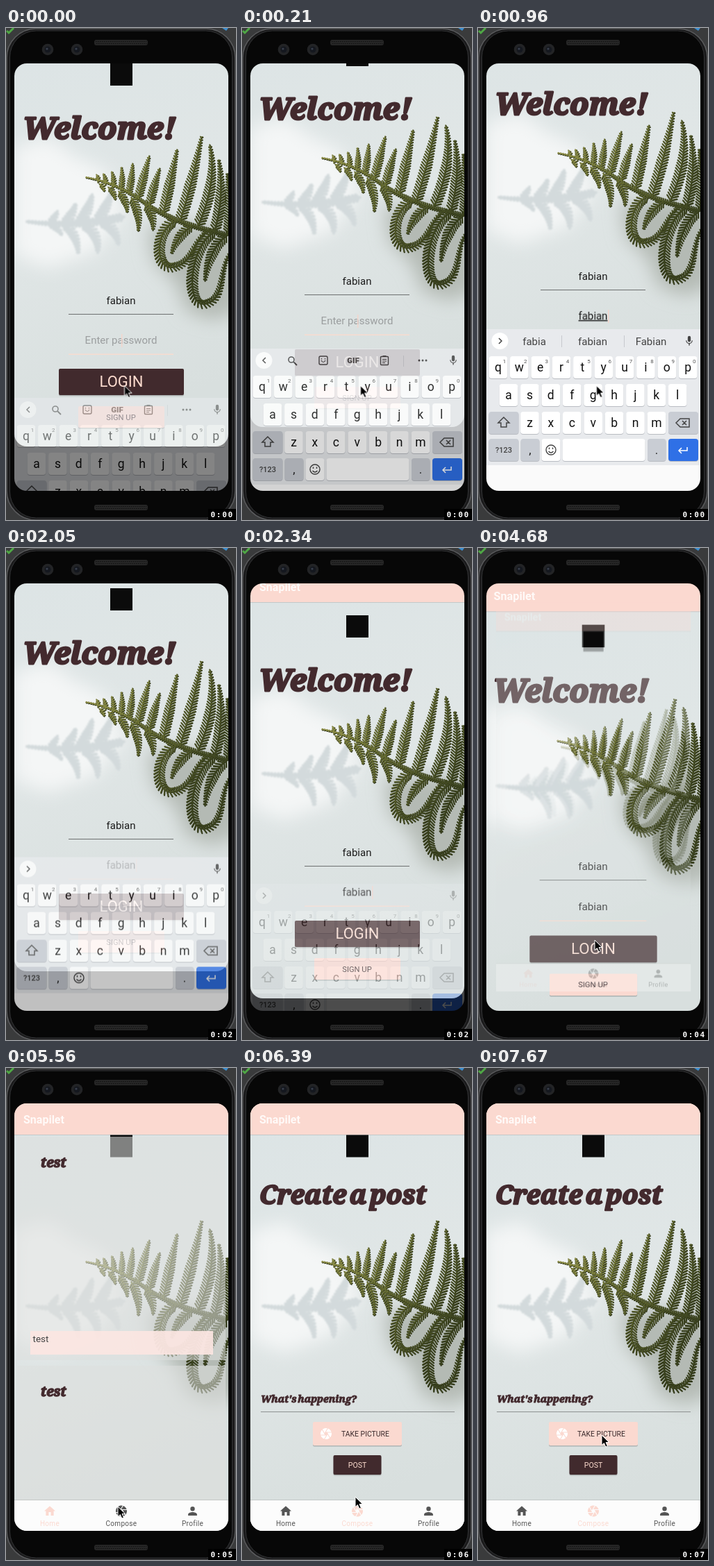
Animation of 331x709 px, one loop 8 s. Source, as an HTML page:

```html
<!DOCTYPE html>
<html lang="en">
<head>
<meta charset="utf-8">
<title>Phone login demo</title>
<style>
  html, body { margin: 0; width: 100%; height: 100%; overflow: hidden; background: #3a3b3c; }
  svg { display: block; width: 331px; height: 709px; }
  text { font-family: Roboto, Arial, sans-serif; text-anchor: middle; white-space: pre; }
  .fat { font: italic 700 44px "Noto Serif", serif; text-anchor: start; fill: #432a2e; stroke: #432a2e; stroke-linejoin: round; word-spacing: -.14em; }
  .clock { font: 700 11px "DejaVu Sans Mono", monospace; letter-spacing: 1.7px; text-anchor: start; }
  .start { text-anchor: start; }
  #login, #home { transform-origin: 166px 359px; }
</style>
</head>
<body>
<svg id="stage" viewBox="0 0 331 709" xmlns="http://www.w3.org/2000/svg"></svg>
<script>
const LOOP = 8000, NAME = 'fabian', APP = 'Snapilet';
const PINK = '#fbd9d0', DARK = '#412a2d';

const rect = (x, y, w, h, fill, rx = 0, more = '') =>
  `<rect x="${x}" y="${y}" width="${w}" height="${h}" rx="${rx}" fill="${fill}" ${more}/>`;
const text = (x, y, s, size, fill, more = '') =>
  `<text x="${x}" y="${y}" font-size="${size}" fill="${fill}" ${more}>${s}</text>`;
const fat = (x, y, s, size, weight) =>
  `<text class="fat" x="${x}" y="${y}" style="font-size:${size}px;stroke-width:${weight}">${s}</text>`;
const icon = (d, x, y, k, fill) =>
  `<path d="${d}" fill="${fill}" transform="translate(${x - 12 * k} ${y - 12 * k}) scale(${k})"/>`;
const line = (d, stroke, w = 1.5, more = '') =>
  `<path d="${d}" fill="none" stroke="${stroke}" stroke-width="${w}" ${more}/>`;

const ICONS = {
  home: 'M10 20v-6h4v6h5v-8h3L12 3 2 12h3v8z',
  person: 'M12 12a4 4 0 1 0 0-8 4 4 0 0 0 0 8zm0 2c-2.67 0-8 1.34-8 4v2h16v-2c0-2.66-5.33-4-8-4z',
  shutter: 'M9.4 10.5l4.77-8.26C13.47 2.09 12.75 2 12 2c-2.4 0-4.6.85-6.32 2.25l3.66 6.35zM21.54 9c-.92-2.92-3.15-5.26-6-6.34L11.88 9zm.26 1h-7.49l.29.5 4.76 8.25C21 16.97 22 14.61 22 12c0-.69-.07-1.35-.2-2zM8.54 12l-3.9-6.75C3.01 7.03 2 9.39 2 12c0 .69.07 1.35.2 2h7.49zm-6.08 3c.92 2.92 3.15 5.26 6 6.34L12.12 15zm11.27 0l-3.9 6.76c.7.15 1.42.24 2.17.24 2.4 0 4.6-.85 6.32-2.25l-3.66-6.35z',
  mic: 'M12 14a3 3 0 0 0 3-3V5a3 3 0 0 0-6 0v6a3 3 0 0 0 3 3zm5-3a5 5 0 0 1-10 0H5.3c0 3.4 2.7 6.2 5.7 6.7V21h2v-3.3c3-.5 5.7-3.3 5.7-6.7z'
};

// Leaflets on both sides of a curve, shrinking towards its end.
const probe = document.createElementNS('http://www.w3.org/2000/svg', 'path');
function frond(d, leaf, gap = 2.6 + leaf * 0.17) {
  probe.setAttribute('d', d);
  const total = probe.getTotalLength();
  let out = d;
  for (let s = 2; s < total - 0.6; s += gap) {
    const p = probe.getPointAtLength(s), q = probe.getPointAtLength(s + 0.5);
    const dir = Math.atan2(q.y - p.y, q.x - p.x);
    const len = leaf * Math.min(1, 0.2 + 1.3 * (1 - s / total));
    for (const side of [-0.95, 0.95]) {
      const a = dir + side;
      out += `M${p.x.toFixed(1)} ${p.y.toFixed(1)}l${(len * Math.cos(a)).toFixed(1)} ${(len * Math.sin(a)).toFixed(1)}`;
    }
  }
  return out;
}
const plant = list => list.map(([d, leaf, gap]) => frond(d, leaf, gap)).join('');

const fern = plant([
  ['M320 362Q240 345 200 316T115 279', 4],
  ['M132 286Q134 280 130 275', 3], ['M143 290Q144 281 140 274', 3.5],
  ['M154 294Q156 281 152 271', 4], ['M165 298Q168 281 166 265', 4.5],
  ['M176 303Q181 280 182 259', 5.5], ['M190 309Q197 280 206 248', 7],
  ['M206 319Q212 292 221 266', 7], ['M226 331Q236 285 246 239', 8.5],
  ['M250 342Q268 285 281 221', 9.5], ['M276 349Q304 285 293 232', 9.5],
  ['M300 356Q314 305 306 254', 9], ['M319 360Q323 320 318 274', 8],
  ['M134 288Q141 293 141 299', 3.5], ['M147 293Q156 301 157 311', 4.5],
  ['M162 299Q174 314 174 329', 6], ['M180 308Q193 330 190 356', 7],
  ['M200 318Q214 336 211 355', 7],
  ['M246 341C214 350 212 412 240 408S268 372 288 356', 9],
  ['M268 348Q246 362 238 388', 8],
  ['M302 356C264 372 256 466 286 461S306 410 322 388', 9.5],
  ['M318 362Q292 380 286 428', 9]
]);
const shade = plant([
  ['M170 336Q100 352 30 343', 6, 5], ['M62 346Q72 336 74 328', 5, 5],
  ['M82 347Q96 334 100 318', 7, 5], ['M104 346Q120 326 124 304', 8, 5],
  ['M130 343Q146 322 152 300', 8, 5], ['M62 346Q76 352 80 362', 5, 5],
  ['M82 347Q102 358 104 388', 7, 5], ['M108 346Q134 356 132 388', 8, 5],
  ['M134 343Q158 350 162 376', 8, 5]
]);

const photo = `<g id="photo" clip-path="url(#screen)">
  ${rect(12, 51, 308, 616, 'url(#wall)')}
  <path d="M12 235L62 222 100 250 145 270 170 330 130 385 60 410 12 390z" fill="#f4f6f6" filter="url(#soft)"/>
  <path d="M205 350L212 400 245 432 260 472 300 485 335 470V345z" fill="#b4bab4" filter="url(#soft)"/>
  ${line(shade, '#d3dadc', 4, 'stroke-linecap="round" filter="url(#haze)"')}
  ${line(fern, '#2b3114', 2.1, 'stroke-linecap="round" transform="translate(.6 .8)"')}
  ${line(fern, 'url(#leaf)', 1.5, 'stroke-linecap="round"')}
</g>`;

const appBar = rect(12, 95, 308, 2, '#000', 0, 'opacity=".12"') + rect(12, 51, 308, 45, PINK) +
  text(25, 80, APP, 16, '#fffaf8', 'class="start" font-weight="700"');
const page = (logoY, body) =>
  `<use href="#photo"/>${rect(150, logoY, 32, 32, '#0b0b0b')}${body}${appBar}`;
const button = (x, y, w, h, fill) =>
  rect(x, y + 1.5, w, h, '#000', 2, 'opacity=".2"') + rect(x, y, w, h, fill, 2);

function nav(active) {
  const items = [['home', 'Home', 63], ['shutter', 'Compose', 166], ['person', 'Profile', 268.5]];
  return rect(12, 622, 308, 1, '#000', 0, 'opacity=".1"') + rect(12, 623, 308, 44, '#fcfcfc') +
    items.map(([name, label, x], i) => {
      const c = i === active ? PINK : '#555';
      return icon(ICONS[name], x, 638.5, 0.8, c) + text(x, 659.5, label, 10, c, 'letter-spacing=".3"');
    }).join('');
}

const login = page(115,
  fat(24, 224, 'Welcome!', 44.6, 3) +
  text(165.5, 462, NAME, 15, '#1c1c1c') + rect(90, 476, 151, 1, '#6d7070') +
  `<g id="hint">${text(165.5, 519, 'Enter password', 15, '#9b9e9f')}${rect(166, 505, 1.4, 19, '#f6d5cb')}</g>` +
  [...NAME].map((c, i) => `<g id="typed${i + 1}">${text(165.5, 519, NAME.slice(0, i + 1), 15, '#1c1c1c', 'text-decoration="underline"')}</g>`).join('') +
  `<g id="typed">${text(165.5, 519, NAME, 15, '#1c1c1c')}</g>` +
  rect(187, 505, 1.4, 19, '#f6d5cb', 0, 'id="caret"') + rect(90, 533.5, 151, 1.4, '#fbdccf') +
  button(76, 555, 180, 38, DARK) + rect(76, 555, 180, 38, '#fff', 2, 'id="loginPress"') +
  text(166, 581, 'LOGIN', 22, '#fddccf') +
  button(104, 609, 124, 31, PINK) + text(165.5, 628.5, 'SIGN UP', 11.2, '#3a2a2c'));

const card = (y, h) => rect(16, y, 300, h, '#dedfdd', 0, 'opacity=".56"');
const home = page(96.5, `<g id="feed">${card(99, 322)}${card(429, 194)}
  ${fat(50, 143, 'test', 19.5, 1.5)}${fat(50, 473, 'test', 19.5, 1.5)}
  ${rect(35, 379, 263, 34, '#fbe6e1', 0, 'opacity=".93"')}
  ${text(38.5, 395, 'test', 13.5, '#444', 'class="start"')}</g>` + nav(0) +
  '<circle id="tabPress" cx="166" cy="645" r="34" fill="#fbd9d0" clip-path="url(#tabs)"/>');

const compose = page(96.5,
  fat(25, 196, 'Create a post', 37.4, 2.5) +
  fat(27, 482, "What's happening?", 14.3, 1) + rect(27, 495, 279, 1, '#8d9191') +
  rect(102, 546, 128, 4, '#000', 2, 'id="lift" opacity=".2"') +
  button(102, 510, 128, 34, PINK) + rect(102, 510, 128, 34, '#fff', 2, 'id="shotPress"') +
  icon(ICONS.shutter, 121, 527, 0.8, '#fff') +
  text(143, 531, 'TAKE PICTURE', 10.4, '#3a2a2c', 'class="start"') +
  button(131.5, 558, 69, 28, DARK) + text(166, 576, 'POST', 10.6, '#fddccf') + nav(1));

const key = (x, y, w, fill) => rect(x, y + 1, w, 32, '#b9bcc2', 4) + rect(x, y, w, 32, fill, 4);
const row = (chars, x, step, y, digits) => [...chars].map((c, i) => {
  const cx = x + i * step;
  return key(cx - 13.3, y, 26.6, '#fff') + text(cx, y + 22, c, 17.5, '#111') +
    (digits ? text(cx + 9, y + 9.5, (i + 1) % 10, 8, '#555') : '');
}).join('');
const GREY = '#c9cdd4', INK = '#444';
const keyboard = rect(12, 434, 308, 233, '#e8eaed') + rect(12, 630, 308, 37, '#fafafa') +
  '<circle cx="31.5" cy="451" r="12" fill="#fff"/>' + icon(ICONS.mic, 304, 451, 0.72, INK) +
  `<g id="tools">${line('M34 447l-4 4 4 4', INK)}
    <circle cx="71" cy="450" r="4" fill="none" stroke="${INK}" stroke-width="1.6"/>${line('M74 453l5 5', INK, 1.8)}
    ${rect(111, 445, 12, 12, 'none', 2, `stroke="${INK}" stroke-width="1.4"`)}${line('M114 451q3 5 6 0M114.5 448v1.5M119.5 448v1.5', INK, 1.2)}
    ${text(160, 455, 'GIF', 11.5, INK, 'font-weight="900"')}
    ${rect(199.5, 445.5, 11, 12, 'none', 1, `stroke="${INK}" stroke-width="1.4"`)}${line('M202.5 444.5h5M202 449.5h6M202 452h6M202 454.5h4', INK, 1.2)}
    ${line('M232.5 444v16', '#cfd2d6', 1)}
    ${[255, 260, 265].map(x => `<circle cx="${x}" cy="451" r="1.5" fill="${INK}"/>`).join('')}</g>` +
  `<g id="arrow">${line('M30 447l4 4-4 4', INK)}</g>` +
  [...NAME].map((c, i) => {
    const word = NAME.slice(0, i + 1);
    return `<g id="words${i + 1}">${[word.slice(0, -1) || word, word, word[0].toUpperCase() + word.slice(1)]
      .map((w, j) => text(81 + 84 * j, 457, w, 15, INK)).join('')}${line('M120.5 443v17M210.5 443v17', '#c6c9ce', 1)}</g>`;
  }).join('') +
  row('qwertyuiop', 29, 30.35, 473, true) + row('asdfghjkl', 44, 30.4, 513) + row('zxcvbnm', 74.5, 30.4, 553) +
  key(15.5, 553, 43, GREY) + line('M37 561l-8 8h4v6h8v-6h4z', INK) +
  key(274, 553, 43, GREY) + line('M291 563h13v12h-13l-6-6zM294 566l6 6M300 566l-6 6', INK) +
  key(15.5, 592, 43, GREY) + text(37, 612, '?123', 11, INK, 'font-weight="500"') +
  key(61.5, 592, 27, GREY) + text(75, 614, ',', 17, '#222') +
  key(91.5, 592, 27, '#fff') + `<circle cx="105" cy="608" r="7" fill="none" stroke="${INK}" stroke-width="1.4"/>` +
  line('M101.5 610q3.5 4 7 0M102.5 604.5v2.5M107.5 604.5v2.5', INK, 1.4) +
  key(121.5, 592, 119, '#fff') + key(244, 592, 26.5, GREY) + text(257, 614, '.', 17, '#222') +
  key(274, 592, 43, '#2f70e6') + line('M301 604v5h-12M293 605l-4 4 4 4', '#fff');

const grille = y => rect(127, y, 77, 8, '#262626', 3) +
  `<path d="M129 ${y + 2.5}h73M130 ${y + 5.5}h73" stroke="#111" stroke-dasharray="1.5 1.5"/>`;
const lens = x => `<circle cx="${x}" cy="31" r="8.3" fill="#232426"/><circle cx="${x}" cy="31" r="4.5" fill="#15181f"/><circle cx="${x - 1}" cy="30" r="1.6" fill="#39404e"/>`;

document.getElementById('stage').innerHTML = `<defs>
  <clipPath id="screen">${rect(12, 51, 308, 616, '#000', 18)}</clipPath>
  <clipPath id="tabs">${rect(12, 623, 308, 44, '#000')}</clipPath>
  <filter id="soft" x="-30%" y="-30%" width="160%" height="160%"><feGaussianBlur stdDeviation="13"/></filter>
  <filter id="haze"><feGaussianBlur stdDeviation="1"/></filter>
  <linearGradient id="wall" x2=".2" y2="1"><stop stop-color="#dce4e5"/><stop offset=".5" stop-color="#e0e6e6"/><stop offset="1" stop-color="#d8dfde"/></linearGradient>
  <linearGradient id="leaf" gradientUnits="userSpaceOnUse" x1="115" y1="270" x2="300" y2="380"><stop stop-color="#96964c"/><stop offset=".4" stop-color="#6a7034"/><stop offset="1" stop-color="#3c4420"/></linearGradient>
  ${photo}</defs>
  ${rect(0, 0, 331, 709, '#3a3b3c')}
  <path d="M1 4l3 3 7-7" stroke="#4fa845" stroke-width="3" fill="none"/><path d="M311 0h9l-3 4z" fill="#3f8fd0"/>
  ${rect(1, 1, 329, 708, '#1b1b1c', 42, 'stroke="#5c5d5f" stroke-width="1.5"')}
  ${rect(5.5, 4, 320, 702, '#070707', 38, 'stroke="#333436"')}
  ${grille(17)}${grille(687)}${lens(60)}${lens(102)}
  <g clip-path="url(#screen)">
    ${rect(12, 51, 308, 616, '#000')}
    <g id="login">${login}</g><g id="home">${home}</g><g id="compose">${compose}</g>
    <g id="keys">${keyboard}</g>
  </g>
  <path id="mouse" d="M0 0v14.5l3.4-3 2.4 5.5 2.6-1.1-2.4-5.4h4.6z" fill="#000" stroke="#fff"/>
  ${rect(291, 693, 40, 16, '#000')}
  ${Array.from({ length: 8 }, (_, i) => text(294.5, 704.5, '0:0' + i, 11, '#fff', `class="clock" id="sec${i}"`)).join('')}`;

// Holds each [time, value] until the next one.
function hold(id, prop, track) {
  const frames = track.map(([t, v]) => ({ offset: t / LOOP, [prop]: v, easing: 'step-end' }));
  frames.push({ offset: 1, [prop]: track[track.length - 1][1] });
  document.getElementById(id).animate(frames, { duration: LOOP, iterations: Infinity });
}
function show(id, from, to = LOOP) {
  const track = from ? [[0, 0], [from, 1]] : [[0, 1]];
  if (to < LOOP) track.push([to, 0]);
  hold(id, 'opacity', track);
}
const y = v => `translateY(${v}px)`;
const at = (a, b) => `translate(${a}px, ${b}px)`;

hold('login', 'transform', [[0, y(-64)], [210, y(-92)], [360, y(-99)], [1950, y(-80)], [2050, y(-57)],
  [2200, y(-18)], [2350, y(0)], [4680, 'scale(1.018)'], [4830, 'scale(1.05)'], [4980, 'scale(1)']]);
hold('keys', 'transform', [[0, y(99)], [210, y(28)], [360, y(0)], [1950, y(4)], [2050, y(11.5)], [2200, y(50)], [2350, y(99)]]);
hold('keys', 'opacity', [[0, .52], [210, .85], [360, 1], [1950, .9], [2050, .77], [2200, .3], [2350, 0]]);

show('tools', 0, 360);
show('arrow', 360);
show('hint', 0, 360);
const typing = [360, 510, 660, 760, 810, 960, 1800];
for (let i = 1; i <= NAME.length; i++) {
  show('typed' + i, typing[i - 1], typing[i]);
  show('words' + i, typing[i - 1], typing[i]);
}
show('typed', 1800);
hold('caret', 'opacity', [[0, 0], [960, 1], [2940, 0], [3330, 1], [3630, 0], [4230, 1], [4680, 0]]);
hold('loginPress', 'opacity', [[0, 0], [3090, .1], [3190, .18], [3330, .23], [3480, .12], [3630, 0]]);

hold('home', 'opacity', [[0, 0], [4680, .31], [4830, .8], [4980, 1]]);
hold('home', 'transform', [[0, 'scale(.85)'], [4680, 'scale(.91)'], [4830, 'scale(.975)'], [4980, 'scale(1)']]);
show('feed', 5130);
hold('tabPress', 'opacity', [[0, 0], [5850, .4], [6000, 0]]);
show('compose', 6000);
hold('shotPress', 'opacity', [[0, 0], [6980, .2], [7130, .35], [7230, .15], [7380, 0]]);
hold('lift', 'opacity', [[0, 0], [7130, .2], [7670, 0]]);

hold('mouse', 'transform', [[0, at(170.5, 515.5)], [2640, at(168, 565)], [5130, at(167, 580)], [5270, at(164, 608)],
  [5420, at(161, 627)], [5560, at(161, 632)], [6290, at(163, 618)], [6430, at(169, 585)],
  [6580, at(175, 550)], [6680, at(178, 534)], [6830, at(178, 529)]]);
hold('mouse', 'opacity', [[0, 1], [1800, 0], [2640, 1]]);

const ticks = [0, 1060, 2050, 3090, 4080, 5130, 6000, 7130, LOOP];
for (let i = 0; i < 8; i++) show('sec' + i, ticks[i], ticks[i + 1]);
</script>
</body>
</html>
```
